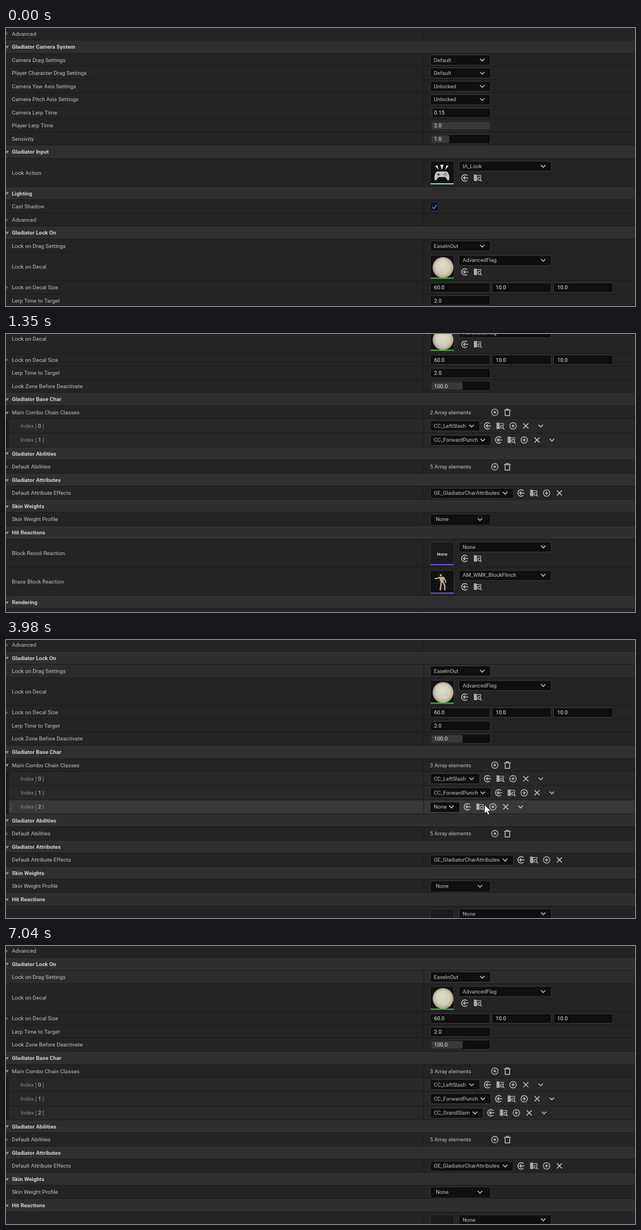
These frames come from a looping animation (1124 by 498 pixels, 7990 ms). An HTML page with a canvas:

```html
<!DOCTYPE html>
<html lang="en">
<head>
<meta charset="utf-8">
<title>Details panel</title>
<style>
html, body { margin: 0; width: 100%; height: 100%; overflow: hidden; background: #242424; }
canvas { position: fixed; left: 0; top: 0; display: block; }
</style>
</head>
<body>
<canvas id="stage" width="1124" height="498"></canvas>
<script>
const ctx = document.getElementById('stage').getContext('2d');
const W = 1124, H = 498, LOOP = 7990;
const ROW = 23.55, ITEM = 25.2, TALL = 50.7, TOP = -1.5;
const FONT = 'Roboto, "Open Sans", sans-serif';
const INK = '#c0c0c0', FIELD = '#0f0f0f', EDGE = '#393939', LINE = '#1a1a1a';
const VALUE = 9.65, LABEL = 9.9;

// ---------- basic drawing ----------
function text(s, x, y, color = INK, size = VALUE, weight = 400) {
  ctx.font = `${weight} ${size}px ${FONT}`;
  ctx.fillStyle = color;
  ctx.fillText(s, x, y - 0.25 + size * 0.355);
  return x + ctx.measureText(s).width;
}
function rect(x, y, w, h, color) {
  ctx.fillStyle = color;
  ctx.fillRect(x, y, w, h);
}
function box(x, y, w, h, r = 3, fill = FIELD, stroke = EDGE) {
  ctx.beginPath();
  ctx.roundRect(x + 0.5, y + 0.5, w - 1, h - 1, r);
  ctx.fillStyle = fill;
  ctx.fill();
  ctx.strokeStyle = stroke;
  ctx.lineWidth = 1;
  ctx.stroke();
}
function poly(points, fill) {
  ctx.beginPath();
  points.forEach(([x, y]) => ctx.lineTo(x, y));
  ctx.closePath();
  ctx.fillStyle = fill;
  ctx.fill();
}
function stroke(points, color = INK, width = 1.4) {
  ctx.beginPath();
  points.forEach(([x, y]) => ctx.lineTo(x, y));
  ctx.strokeStyle = color;
  ctx.lineWidth = width;
  ctx.stroke();
}
function ring(x, y, r, color = INK, width = 1.3, from = 0, to = Math.PI * 2) {
  ctx.beginPath();
  ctx.arc(x, y, r, from, to);
  ctx.strokeStyle = color;
  ctx.lineWidth = width;
  ctx.stroke();
}
function disc(x, y, r, fill) {
  ctx.beginPath();
  ctx.arc(x, y, r, 0, Math.PI * 2);
  ctx.fillStyle = fill;
  ctx.fill();
}

// ---------- icons ----------
function chevron(x, y) {
  stroke([[x - 4, y - 2], [x, y + 2], [x + 4, y - 2]], INK, 1.5);
}
function useIcon(x, y) {
  ring(x, y, 5.8, INK, 1.5, 0.75, Math.PI * 2 - 0.75);
  stroke([[x + 6, y], [x - 2.5, y]], INK, 1.5);
  stroke([[x + 0.5, y - 3], [x - 2.5, y], [x + 0.5, y + 3]], INK, 1.5);
}
function browseIcon(x, y) {
  poly([[x - 7, y - 6], [x - 3, y - 6], [x - 1.5, y - 4.5], [x - 1, y + 5.5], [x - 7, y + 5.5]], '#aaa');
  stroke([[x - 2, y - 4.3], [x + 5.5, y - 4.3], [x + 5.5, y - 1]], '#aaa', 1.3);
  ring(x + 2.8, y + 1.6, 2.5, INK, 1.2);
  stroke([[x + 4.5, y + 3.4], [x + 7, y + 6.2]], INK, 1.4);
}
function plusIcon(x, y) {
  ring(x, y, 5.8);
  stroke([[x - 3, y], [x + 3, y]]);
  stroke([[x, y - 3], [x, y + 3]]);
}
function trashIcon(x, y) {
  stroke([[x - 6, y - 4], [x + 6, y - 4]], INK, 1.5);
  stroke([[x - 2, y - 4], [x - 2, y - 6], [x + 2, y - 6], [x + 2, y - 4]], INK, 1.3);
  stroke([[x - 4, y - 3], [x - 4, y + 6], [x + 4, y + 6], [x + 4, y - 3]], INK, 1.5);
}
function crossIcon(x, y) {
  stroke([[x - 4.5, y - 4.5], [x + 4.5, y + 4.5]], INK, 1.5);
  stroke([[x + 4.5, y - 4.5], [x - 4.5, y + 4.5]], INK, 1.5);
}
function gearIcon(x, y) {
  ring(x, y, 4.2, INK, 1.2);
  for (let i = 0; i < 8; i++) {
    const c = Math.cos(i * Math.PI / 4), s = Math.sin(i * Math.PI / 4);
    stroke([[x + c * 4.3, y + s * 4.3], [x + c * 6.5, y + s * 6.5]], INK, 1.7);
  }
}
function cubeIcon(x, y) {
  ring(x, y, 6, '#ddd', 1.2);
  poly([[x, y - 4], [x + 3.6, y - 2], [x + 3.6, y + 2], [x, y + 4], [x - 3.6, y + 2], [x - 3.6, y - 2]], '#ddd');
  stroke([[x - 3.6, y - 2], [x, y], [x + 3.6, y - 2]], '#151515', 1);
  stroke([[x, y], [x, y + 4]], '#151515', 1);
}
function pad(x, y) {
  poly([[x - 12, y - 12], [x - 8, y - 13], [x - 6, y - 5]], '#e6e6e6');
  poly([[x - 3, y - 14], [x + 3, y - 14], [x, y - 5]], '#e6e6e6');
  poly([[x + 12, y - 12], [x + 8, y - 13], [x + 6, y - 5]], '#e6e6e6');
  ctx.beginPath();
  ctx.moveTo(x - 8, y - 2);
  ctx.lineTo(x + 8, y - 2);
  ctx.bezierCurveTo(x + 13, y - 1, x + 15, y + 12, x + 12, y + 14);
  ctx.bezierCurveTo(x + 9, y + 15, x + 8, y + 8, x + 5, y + 8);
  ctx.lineTo(x - 5, y + 8);
  ctx.bezierCurveTo(x - 8, y + 8, x - 9, y + 15, x - 12, y + 14);
  ctx.bezierCurveTo(x - 15, y + 12, x - 13, y - 1, x - 8, y - 2);
  ctx.fillStyle = '#c4c4c4';
  ctx.fill();
  stroke([[x - 8.5, y + 3.5], [x - 3.5, y + 3.5]], '#333', 1.4);
  stroke([[x - 6, y + 1], [x - 6, y + 6]], '#333', 1.4);
  [[0, -2.3], [2.3, 0], [0, 2.3], [-2.3, 0]].forEach(([a, b]) => disc(x + 6 + a, y + 3.5 + b, 0.9, '#333'));
}
function ball(x, y) {
  const g = ctx.createRadialGradient(x + 1, y - 4, 2, x + 2, y + 1, 19);
  g.addColorStop(0, '#e2dbca');
  g.addColorStop(0.65, '#d3cab7');
  g.addColorStop(1, '#a69d8a');
  disc(x + 2, y + 1, 18.6, g);
}
function figure(x, y) {
  const skin = '#c2ab90';
  disc(x - 2, y - 12, 2, skin);
  poly([[x - 6, y - 9], [x + 4, y - 9], [x + 3, y + 1], [x - 2, y + 1]], skin);
  stroke([[x - 5, y - 8], [x - 9, y - 6], [x - 13, y - 6]], skin, 2);
  stroke([[x + 3, y - 8], [x + 6, y - 3], [x + 7, y + 2]], skin, 2);
  stroke([[x - 1, y], [x - 2, y + 7], [x - 3, y + 15]], skin, 2.6);
  stroke([[x + 2, y], [x + 5, y + 7], [x + 5, y + 15]], skin, 2.6);
}
function noneArt(x, y) {
  text('None', x - 9, y + 1, '#f0f0f0', 8, 500);
}

// ---------- value widgets, each drawn around the row centre y ----------
function combo(label, right, y, h = 19, x = 758, pad = 6.5, inset = 15) {
  box(x, Math.round(y - h / 2), right - x, h);
  text(label, x + pad, y);
  chevron(right - inset, y - 0.25);
}
const select = label => y => combo(label, 866, y);
const weightSelect = y => combo('None', 866, y, 21, 758, 10, 19);

function input(x, y, label, fill = 0, w = 108) {
  const t = Math.round(y - 9);
  box(x, t, w, 18);
  if (fill) {
    ctx.beginPath();
    ctx.roundRect(x + 2, t + 2, fill, 14, Math.min(2, fill / 2));
    ctx.fillStyle = EDGE;
    ctx.fill();
  }
  text(label, x + 7, y, '#ececec');
}
const number = (label, fill) => y => input(758, y, label, fill);
const vector = y => ['60.0', '10.0', '10.0'].forEach((v, i) => input(758 + i * 110, y, v, 0, 107));

function check(y) {
  const t = Math.round(y - 8);
  box(758, t, 15, 16);
  stroke([[761.5, t + 8.5], [764.5, t + 11.5], [770, t + 5]], '#1e7fee', 2);
}
const asset = (label, art, stripe) => y => {
  const c = Math.round(y), t = c - 21;
  box(758, t, 43, 43, 1, label === 'None' ? '#1b1b1b' : '#111', '#363636');
  art(779, c);
  rect(759, t + 40, 41, 2, stripe);
  combo(label, 975, y - 11.5, 19, 809, 7);
  useIcon(820, y + 9.25);
  browseIcon(843, y + 9.25);
};
const list = count => y => {
  text(count + ' Array elements', 757.5, y, INK, LABEL);
  plusIcon(873.5, y - 0.25);
  trashIcon(896, y - 0.25);
};
const classPick = (label, right, more) => y => {
  const c = y - 0.25;
  combo(label, right, y);
  useIcon(right + 13.5, c);
  browseIcon(right + 36.5, c);
  plusIcon(right + 59, c);
  crossIcon(right + 82, c);
  if (more) chevron(right + 108.5, c);
};

// ---------- rows ----------
const head = label => ({ label, h: ROW, head: true, arrow: 'open' });
const row = (label, draw, arrow, h = ROW) => ({ label, draw, arrow, h });
const tall = (label, draw) => row(label, draw, '', TALL);
const item = (index, label, right) => ({ index, h: ITEM, draw: classPick(label, right, true) });

function buildRows(third) {
  const extra = third ? [third === 'None' ? item(2, 'None', 811) : item(2, third, 853)] : [];
  return [
    row('Advanced', null, 'shut'),
    head('Gladiator Camera System'),
    row('Camera Drag Settings', select('Default')),
    row('Player Character Drag Settings', select('Default')),
    row('Camera Yaw Axis Settings', select('Unlocked')),
    row('Camera Pitch Axis Settings', select('Unlocked')),
    row('Camera Lerp Time', number('0.15', 2)),
    row('Player Lerp Time', number('2.0', 104)),
    row('Sensivity', number('1.0', 32)),
    head('Gladiator Input'),
    tall('Look Action', asset('IA_Look', pad, '#73d7de')),
    head('Lighting'),
    row('Cast Shadow', check),
    row('Advanced', null, 'shut'),
    head('Gladiator Lock On'),
    row('Lock on Drag Settings', select('EaseInOut')),
    tall('Lock on Decal', asset('AdvancedFlag', ball, '#3fae46')),
    row('Lock on Decal Size', vector, 'shut'),
    row('Lerp Time to Target', number('2.0')),
    row('Look Zone Before Deactivate', number('100.0', 56)),
    head('Gladiator Base Char'),
    row('Main Combo Chain Classes', list(third ? 3 : 2), 'open'),
    item(0, 'CC_LeftSlash', 847),
    item(1, 'CC_ForwardPunch', 867),
    ...extra,
    head('Gladiator Abilities'),
    row('Default Abilities', list(5), 'shut'),
    head('Gladiator Attributes'),
    row('Default Attribute Effects', classPick('GE_GladiatorCharAttributes', 907)),
    head('Skin Weights'),
    row('Skin Weight Profile', weightSelect),
    head('Hit Reactions'),
    tall('Block Recoil Reaction', asset('None', noneArt, '#5a55cf')),
    tall('Brace Block Reaction', asset('AM_WMK_BlockFlinch', figure, '#5a55cf')),
    head('Rendering'),
    row('', null)
  ];
}
const pages = { two: buildRows(), empty: buildRows('None'), full: buildRows('CC_GrandSlam') };

function arrow(kind, y) {
  if (kind === 'open') poly([[-2, y - 2], [5, y - 2], [1.5, y + 3]], '#8a8a8a');
  if (kind === 'shut') poly([[0, y - 3], [3, y], [0, y + 3]], '#666');
}
function fillOf(r, hover, lit) {
  if (hover) return '#383838';
  if (r.head) return '#2f2f2f';
  if (lit) return '#2c2c2c';
  return r.index !== undefined ? '#282828' : '#242424';
}
function drawRow(r, top, hover, lit) {
  const t = Math.round(top), b = Math.round(top + r.h), y = top + r.h / 2;
  const nested = r.index !== undefined;
  rect(0, t, W, b - t, fillOf(r, hover, lit));
  if (nested) rect(0, t, 5, b - t, '#1c1c1c');
  rect(0, b - 1, W, 1, LINE);
  if (!r.head) rect(746, t, 1, b - t, LINE);
  arrow(r.arrow, Math.round(y));
  if (nested) {
    let x = text('Index [ ', 26, y, '#858585', LABEL);
    x = text(r.index, x, y, '#cfcfcf', LABEL);
    text(' ]', x, y, '#858585', LABEL);
    if (hover) {
      for (let i = 0; i < 10; i++) rect(7 + i % 2 * 3, Math.round(y) - 6 + (i >> 1) * 3, 1, 1, '#777');
    }
  } else {
    text(r.label, 10.5, y, r.head ? '#d2d2d2' : INK, LABEL, r.head ? 700 : 400);
  }
  if (r.draw) r.draw(y);
}

function drawMenu(pointer) {
  rect(758, 309, 244, 137, '#3a3a3a');
  rect(759, 310, 242, 24, '#262626');
  box(765, 312, 206, 18, 8, FIELD, '#1e6fc4');
  ring(774.5, 319.5, 4, '#d0d0d0', 1.6);
  stroke([[777.5, 322.5], [782, 327]], '#d0d0d0', 1.8);
  text('Search', 789, 321, '#707070', 12);
  gearIcon(988, 321);
  rect(759, 333, 242, 91, '#151515');
  ['None', 'CC_ForwardPunch', 'CC_GrandSlam', 'CC_LeftSlash', 'ComboContainer'].forEach((label, i) => {
    const y = 341.7 + i * 18.3;
    if (Math.abs(pointer.y - y) < 9.15) rect(759, Math.round(y - 9), 242, 18, '#242424');
    if (i) cubeIcon(780, Math.round(y)); else ring(780, 342, 5.6, '#ddd', 2.2);
    text(label, 792, y, INK, 11.1);
  });
  rect(759, 424, 242, 21, '#2f2f2f');
  text('5 items', 763, 434, INK, 10.9);
}

function drawPointer({ x, y }) {
  const shape = [[0, 0], [0, 16], [3.8, 12.6], [6.2, 18.2], [9, 17], [6.6, 11.6], [11.6, 11.4]];
  const pts = shape.map(([a, b]) => [x + a, y + b]);
  poly(pts, '#fff');
  ctx.lineJoin = 'round';
  stroke([...pts, pts[0]], '#111', 0.9);
  ctx.lineJoin = 'miter';
}

// ---------- timing ----------
const scrolls = [[0, 0], [990, 28], [1040, 140], [1090, 224], [1300, 335], [1350, 418.6],
  [1620, 391], [1700, 363], [1780, 334.8]];
const path = [[2090, 1028, 376], [2330, 985, 300], [2620, 935, 222], [2870, 952, 245], [2960, 952, 245],
  [3040, 881, 236], [3650, 881, 236], [3720, 874, 224], [3830, 873, 226], [3980, 855, 295], [4040, 855, 295],
  [4240, 820, 298], [4390, 820, 298], [4510, 790, 298], [4620, 788, 301], [4770, 789, 314], [5079, 789, 314],
  [5080, 838, 388], [5130, 838, 388], [5450, 824, 375], [5690, 824, 375], [5990, 1108, 462],
  [6190, 1086, 475], [6600, 1086, 475], [7035, 950, 129]];

function scrollAt(t) {
  return scrolls.filter(s => s[0] <= t).pop()[1];
}
function pointerAt(t) {
  const i = path.findIndex(p => p[0] > t);
  if (i < 1) return null;
  const [t0, x0, y0] = path[i - 1], [t1, x1, y1] = path[i];
  const k = (t - t0) / (t1 - t0), e = k * k * (3 - 2 * k);
  return { x: x0 + (x1 - x0) * e, y: y0 + (y1 - y0) * e };
}

function draw(t) {
  const rows = t < 3780 ? pages.two : t < 5650 ? pages.empty : pages.full;
  const menu = t >= 4560 && t < 5650;
  const pointer = pointerAt(t);
  // one row keeps a faint highlight once the list has settled
  const litY = t >= 1780 ? 55 : -1;
  rect(0, 0, W, H, '#242424');
  let top = TOP - scrollAt(t);
  for (const r of rows) {
    const holds = y => y >= top && y < top + r.h;
    if (top + r.h > 0 && top < H) {
      const hover = pointer && !menu && !r.head && holds(pointer.y);
      drawRow(r, top, hover, litY > 0 && holds(litY));
    }
    top += r.h;
  }
  if (menu) drawMenu(pointer);
  if (pointer) drawPointer(pointer);
}

const start = performance.now();
function tick() {
  draw((performance.now() - start) % LOOP);
  requestAnimationFrame(tick);
}
tick();
</script>
</body>
</html>
```
